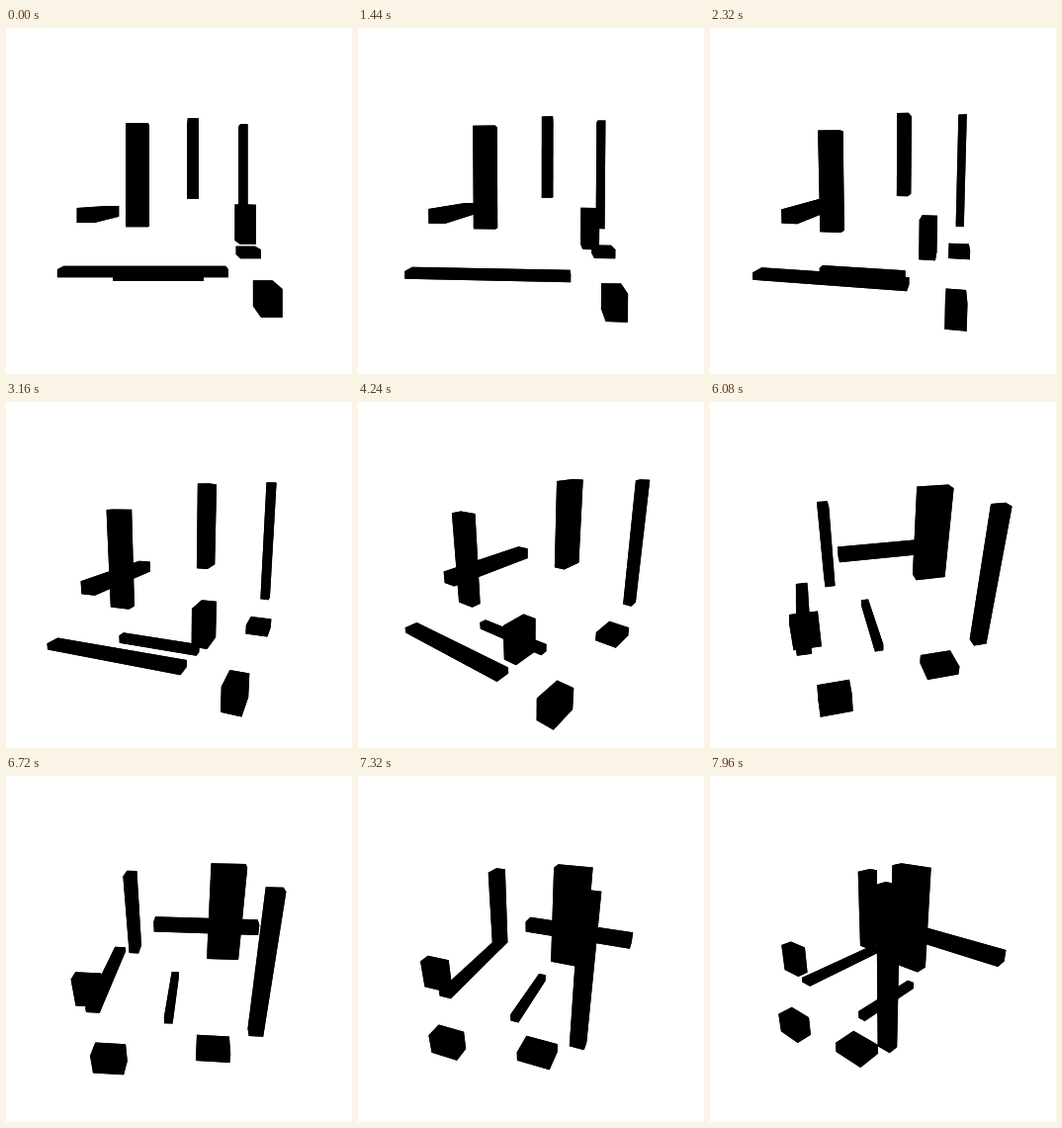
An HTML page with a canvas that plays this animation: 350x350 px, repeating every 8000 ms.

```html
<!DOCTYPE html>
<html lang="en">
<head>
<meta charset="utf-8">
<title>Orbiting blocks</title>
<style>
  html, body { margin: 0; width: 100%; height: 100%; overflow: hidden; background: #fff; }
  canvas { display: block; width: 100vw; height: 100vh; }
</style>
</head>
<body>
<canvas id="stage" width="350" height="350"></canvas>
<script>
const ctx = document.getElementById('stage').getContext('2d');
const SIZE = 350, CENTER = SIZE / 2, DISTANCE = SIZE, LOOP = 8000, DEG = Math.PI / 180;
const X = 0, Y = 1, Z = 2;
const LONG = 127.5, MEDIUM = 88, SHORT = 29.5;

// A bar runs along one axis; the section gives its size on the other two.
// Axes: x to the right, y down, z towards the viewer.
function bar(axis, length, center, section) {
  const size = [...section];
  size.splice(axis, 0, length);
  // Bits of the corner number choose a side on each axis.
  return Array.from({ length: 8 }, (_, corner) =>
    center.map((c, i) => c + size[i] * ((corner >> i & 1) - 0.5)));
}

const bars = [
  bar(X, LONG, [-27, 54, 85], [6, 14]),
  bar(Y, LONG, [78, -28.5, -71], [9, 12]),
  bar(Z, LONG, [-84.5, 13, -27], [16, 13.5]),
  bar(X, MEDIUM, [-20, 73.5, 9.5], [8.5, 9]),
  bar(Y, MEDIUM, [-35.5, -22, 52.5], [19, 10.5]),
  bar(Y, MEDIUM, [15.5, -46.5, -43], [12, 29.5]),
  bar(Y, SHORT, [51.5, 17.5, 80], [12, 24]),
  bar(Z, SHORT, [73.5, 81, 61], [17, 22.5]),
  bar(Z, SHORT, [77, 57, -36], [22, 9.5])
];

const yawAt = t => (2.115 * t ** 2 - 1.4e-5 * t ** 6) * DEG;
const pitchAt = t => 29.4 * Math.sin(0.245 * t) ** 2.45 * DEG;

function makeProjector(yaw, pitch) {
  const cosYaw = Math.cos(yaw), sinYaw = Math.sin(yaw);
  const cosPitch = Math.cos(pitch), sinPitch = Math.sin(pitch);
  return ([x, y, z]) => {
    const across = x * cosYaw - z * sinYaw;
    const depth = x * sinYaw + z * cosYaw;
    const scale = DISTANCE / (DISTANCE - depth * cosPitch + y * sinPitch);
    return [CENTER + across * scale, CENTER + (y * cosPitch + depth * sinPitch) * scale];
  };
}

function fillFace(points) {
  ctx.beginPath();
  for (const point of points) ctx.lineTo(...point);
  ctx.fill();
}

function drawBar(corners, project) {
  const points = corners.map(project);
  for (const axis of [X, Y, Z]) {
    const u = 1 << (axis + 1) % 3, v = 1 << (axis + 2) % 3;
    for (const side of [0, 1 << axis]) {
      fillFace([0, u, u + v, v].map(offset => points[side + offset]));
    }
  }
}

function draw(ms) {
  const t = ms % LOOP / 1000;
  const project = makeProjector(yawAt(t), pitchAt(t));
  ctx.fillStyle = '#fff';
  ctx.fillRect(0, 0, SIZE, SIZE);
  ctx.fillStyle = '#000';
  for (const corners of bars) drawBar(corners, project);
}

const start = performance.now();
function frame() {
  draw(performance.now() - start);
  requestAnimationFrame(frame);
}
frame();
</script>
</body>
</html>
```
